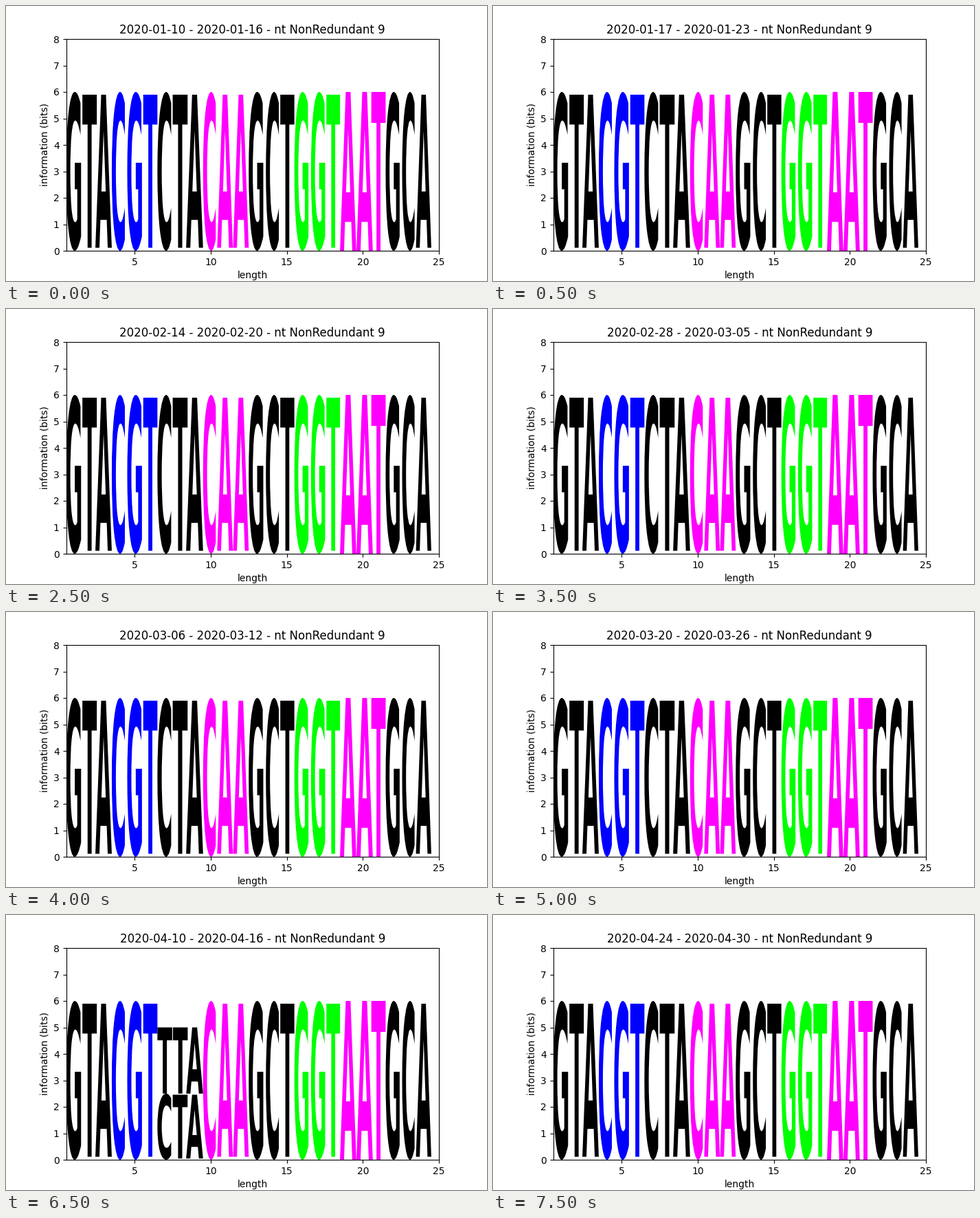
A matplotlib script for the animation above (8 s loop, 700 by 400 pixels).

```python
import numpy as np
import matplotlib.pyplot as plt
from matplotlib.animation import FuncAnimation
from matplotlib.patches import PathPatch
from matplotlib.textpath import TextPath
from matplotlib.transforms import Affine2D

WEEKS = 16
STEP_MS = 500
FIRST_DAY = np.datetime64("2020-01-10")
SPLIT_WEEK = 13
SPLIT_CODON = 2
BOLD = {"family": "DejaVu Sans", "weight": "bold"}

CODONS = [
    ("GTA", "#000000"), ("CGT", "#0000ff"), ("CTA", "#000000"),
    ("CAA", "#ff00ff"), ("GCT", "#000000"), ("GGT", "#00ff00"),
    ("AAT", "#ff00ff"), ("GCA", "#000000"),
]

fig, ax = plt.subplots(figsize=(7, 4), dpi=100)
ax.set(xlim=(0.5, 25), ylim=(0, 8), xlabel="length",
       ylabel="information (bits)",
       xticks=range(5, 26, 5), yticks=range(9))
title = ax.set_title("")


def add_codon(text, slot, bottom, height, color):
    """Stretch a codon to fill its three positions and its share of bits."""
    path = TextPath((0, 0), text, size=100, prop=BOLD)
    box = path.get_extents()
    fit = (Affine2D()
           .translate(-box.x0, -box.y0)
           .scale(3 / box.width, height / box.height)
           .translate(0.5 + 3 * slot, bottom))
    patch = PathPatch(fit.transform_path(path), facecolor=color, linewidth=0)
    return ax.add_patch(patch)


whole = [add_codon(text, slot, 0, 6, color)
         for slot, (text, color) in enumerate(CODONS)]
halves = [add_codon("CTA", SPLIT_CODON, 0, 2.5, "#000000"),
          add_codon("TTA", SPLIT_CODON, 2.5, 2.5, "#000000")]


def draw(week):
    start = FIRST_DAY + 7 * week
    title.set_text(f"{start} - {start + 6} - nt NonRedundant 9")
    split = week == SPLIT_WEEK
    whole[SPLIT_CODON].set_visible(not split)
    for half in halves:
        half.set_visible(split)
    return [title, *whole, *halves]


anim = FuncAnimation(fig, draw, frames=WEEKS, interval=STEP_MS,
                     repeat=True, repeat_delay=0)
plt.show()
```
